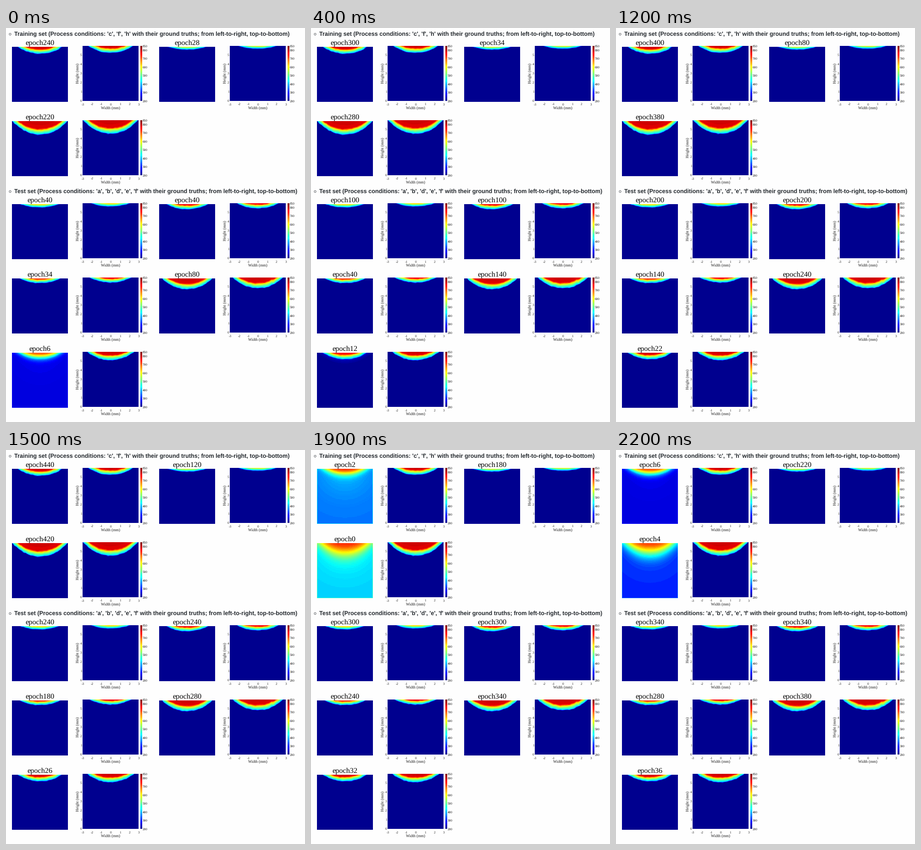
A matplotlib script for the animation above (8500 ms loop, 652 by 859 pixels).

```python
import numpy as np
import matplotlib.pyplot as plt
from matplotlib.animation import FuncAnimation
from matplotlib.colors import ListedColormap
from matplotlib.patches import Circle

W, H, DPI = 652, 859, 64
STEP, LAST = 100, 2200          # ms per frame, time of the last change
PERIOD = 150                    # ms between two epochs
PW, PH, ROW, COL = 122, 120, 162, 321
COLD, HOT = 200, 850
EPOCHS = list(range(0, 41, 2)) + list(range(60, 461, 20))

plt.rcParams["text.hinting"] = "none"

level = np.arange(1, 65) / 64
JET = ListedColormap(np.clip(
    np.stack([1.5 - abs(4 * level - c) for c in (3, 2, 1)], axis=1), 0, 1))

# top, name, conditions, (first epoch, predicted depth, true depth) per panel
SECTIONS = [
    (39, "Training", "cfh", [(240, 15, 15), (28, 6, 6), (220, 29, 29)]),
    (382, "Test", "abdef", [(40, 7, 7), (40, 11, 11), (34, 10, 11),
                            (80, 23, 23), (6, 14, 18)]),
]

X, Y = np.meshgrid(np.arange(PW) - 60.5, np.arange(PH) + .5)


def smooth_noise(seed, cell=5):
    knots = np.random.default_rng(seed).normal(
        0, 1, (PH // cell + 2, PW // cell + 2))
    kx, ky = (np.arange(n) * cell for n in knots.shape[::-1])
    rows = np.array([np.interp(np.arange(PW), kx, r) for r in knots])
    return np.array([np.interp(np.arange(PH), ky, c) for c in rows.T]).T


def pool(depth):
    """Relative depth of every pixel (1 on the rim) and the peak heat."""
    half = 36 + .82 * depth
    return Y / depth + abs(X / half) ** 2.2, min(800, 400 + 34 * depth)


def settled(depth, seed):
    s, peak = pool(depth)
    s = s + smooth_noise(seed) * min(.035, .5 / depth)
    core = min(.55, depth / 50)
    stops = [0, core, core + .4 * (1 - core), 1 - .8 / depth, 1 + 1.2 / depth]
    heat = [peak, peak - 20, 430 + .36 * (peak - 430), 415, COLD]
    return np.interp(s, stops, heat)


def early(depth, e):
    s, peak = pool(depth)
    fade = np.exp(-(e / 5.5) ** 3)
    base = COLD + 210 * np.exp(-(e / 5) ** 1.2)
    glow = np.exp(-(s / .9) ** 1.9)
    top = peak * (.86 + .06 * fade)
    v = base + (top - base) * glow
    v += 45 * fade * (1 - glow) * np.exp(-(X ** 2 + Y ** 2) / 60 ** 2)
    grain = np.sin(2 * np.pi * X / 3) * np.sin(2 * np.pi * Y / 3)
    rim = (abs(X) > PW / 2 - 1) | (Y > PH - 1)
    return v + fade * (20 * grain + 60 * rim)


def predicted(depth, final, e):
    mix = np.clip((e - 5) / 10, 0, 1)
    return final if mix == 1 else (1 - mix) * early(depth, e) + mix * final


fig = plt.figure(figsize=(W / DPI, H / DPI), dpi=DPI, facecolor="#fefefe")
ax = fig.add_axes([0, 0, 1, 1])
ax.axis("off")


def label(x, y, text, px, ha="center", va="baseline", **kw):
    kw = {"family": "Liberation Serif", "color": "#1a1a1a", **kw}
    return ax.text(x, y, text, fontsize=px * 72 / DPI, ha=ha, va=va, **kw)


def picture(data, x, y, w, h):
    return ax.imshow(data, cmap=JET, vmin=COLD, vmax=HOT, aspect="auto",
                     interpolation="nearest", extent=(x, x + w, y + h, y))


def heading(y, name, conditions):
    ax.add_patch(Circle((9, y - 3.5), 2.1, fill=False, ec="#40454a", lw=.9))
    marks = ", ".join(f"'{c}'" for c in conditions)
    label(17.5, y, f"{name} set (Process conditions: {marks} with their ground "
          "truths; from left-to-right, top-to-bottom)", 12.6, "left",
          color="#24292e", family="Liberation Sans", weight="bold")


def truth_plot(x, y, data):
    picture(data, x + .4, y, PW - .5, PH)
    picture(np.linspace(HOT, COLD, PH)[:, None], x + 126, y, 3.5, PH)
    for k in range(7):
        label(x + .5 + k * 20.3, y + 129.5, str(k - 3), 7.3)
    for k in range(6):
        label(x - 1.5, y + 122 - k * 20, str(k), 7.3, "right")
    for v in (HOT, *range(800, 100, -100)):
        label(x + 131, y + 2.5 + (HOT - v) / (HOT - COLD) * PH, str(v), 7.3,
              "left")
    label(x + 61, y + 138, "Width (mm)", 8.5)
    label(x - 10, y + 60, "Height (mm)", 8.5, va="center", rotation=90)


views = []
for top, name, conditions, panels in SECTIONS:
    heading(top - 22, name, conditions)
    for k, (first, guess, truth) in enumerate(panels):
        y, col = top + ROW * (k // 2), k % 2
        x = 13 + (COL - .5) * col
        truth_plot(167 + COL * col, y, settled(truth, top + k))
        final = settled(guess, top + k + 20)
        image = picture(final, x, y + 2, PW - .5, PH)
        title = label(x + 61, y - 2.5, "", 16.2, color="black")
        phase = PERIOD * (1 + col) // 3
        views.append((image, title, EPOCHS.index(first), phase, guess, final))

ax.set_xlim(0, W)
ax.set_ylim(H, 0)


def update(i):
    t = min(i * STEP, LAST)
    for image, title, start, phase, guess, final in views:
        e = EPOCHS[(start + (t + phase) // PERIOD) % len(EPOCHS)]
        image.set_data(predicted(guess, final, e))
        title.set_text(f"epoch{e}")
    return [artist for view in views for artist in view[:2]]


anim = FuncAnimation(fig, update, frames=85, interval=STEP, repeat=True,
                     repeat_delay=0, blit=False)
plt.show()
```
